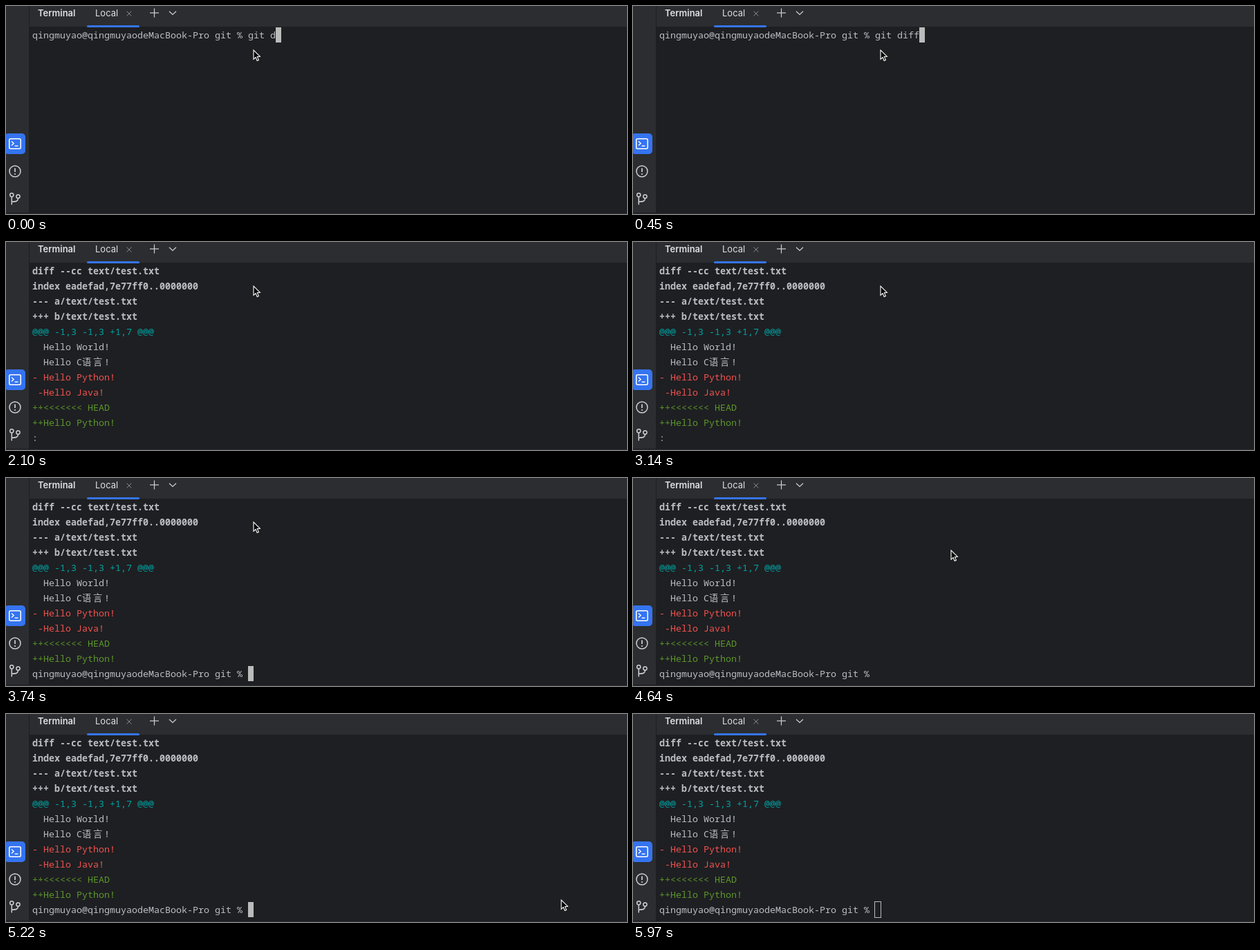
These frames come from a looping animation (898x302 px, 5990 ms). An HTML page with a canvas:

```html
<!DOCTYPE html>
<html lang="en">
<head>
<meta charset="utf-8">
<title>Terminal diff</title>
<style>
  html, body { margin: 0; width: 100%; height: 100%; overflow: hidden; background: #1e1f22; }
  canvas { display: block; width: 898px; height: 302px; }
</style>
</head>
<body>
<canvas id="stage"></canvas>
<script>
const W = 898, H = 302, LOOP = 5990;
const CELL = 8, ROW = 22, LEFT = 38, TOP = 31;
const MONO = '13.33px "Noto Sans Mono", "Noto Sans CJK SC", monospace';
const UI = '13px Inter, sans-serif';
const PANEL = '#2b2d30', BACK = '#1e1f22', BLUE = '#3574f0';
const TEXT = '#bcbec4', ICON = '#ced0d6', TITLE = '#dfe1e5', CARET = '#bbbbbb';
const CYAN = '#00a3a3', RED = '#f0524f', GREEN = '#5c962c';
const PROMPT = 'qingmuyao@qingmuyaodeMacBook-Pro git % ';

const DIFF = [
  ['diff --cc text/test.txt', TEXT, true],
  ['index eadefad,7e77ff0..0000000', TEXT, true],
  ['--- a/text/test.txt', TEXT, true],
  ['+++ b/text/test.txt', TEXT, true],
  ['@@@ -1,3 -1,3 +1,7 @@@', CYAN],
  ['  Hello World!', TEXT],
  ['  Hello C语言!', TEXT],
  ['- Hello Python!', RED],
  [' -Hello Java!', RED],
  ['++<<<<<<< HEAD', GREEN],
  ['++Hello Python!', GREEN]
];

// [start, value] steps
const TYPED = [[0, 'git d'], [150, 'git di'], [300, 'git dif'], [450, 'git diff']];
const CARETS = [
  [0, 'block'], [2100, 'none'], [2550, 'block'], [3140, 'none'], [3590, 'block'],
  [4640, 'none'], [5220, 'block'], [5670, 'none'], [5970, 'outline']
];
const POINTER = [
  [0, [357, 63]], [4640, [459, 104]], [4780, [559, 170]], [4930, [580, 176]],
  [5080, [720, 237]], [5220, [802, 269]], [5370, [836, 277]], [5520, [857, 285]], [5670, null]
];

const canvas = document.getElementById('stage');
const ctx = canvas.getContext('2d');
const dpr = window.devicePixelRatio || 1;
canvas.width = W * dpr;
canvas.height = H * dpr;
ctx.scale(dpr, dpr);

function valueAt(steps, t) {
  let value = steps[0][1];
  for (const [start, v] of steps) if (t >= start) value = v;
  return value;
}

function box(x, y, w, h, color) {
  ctx.fillStyle = color;
  ctx.fillRect(x, y, w, h);
}

function roundBox(x, y, w, h, r) {
  ctx.beginPath();
  ctx.roundRect(x, y, w, h, r);
}

function label(text, x, y, font, color) {
  ctx.font = font;
  ctx.fillStyle = color;
  ctx.fillText(text, x, y);
}

function line(color, width, ...points) {
  ctx.strokeStyle = color;
  ctx.lineWidth = width;
  ctx.beginPath();
  points.forEach(([x, y]) => ctx.lineTo(x, y));
  ctx.stroke();
}

function ring(x, y, r) {
  ctx.beginPath();
  ctx.arc(x, y, r, 0, Math.PI * 2);
  ctx.stroke();
}

// One glyph per terminal cell; CJK glyphs take two.
function print(text, row, color, bold) {
  const y = TOP + row * ROW + 16;
  let x = LEFT;
  for (const ch of text) {
    label(ch, x, y, (bold ? 'bold ' : '') + MONO, color);
    x += ch > '\u2e80' ? 2 * CELL : CELL;
  }
}

function drawCaret(col, row, style) {
  const x = LEFT + col * CELL, y = TOP + row * ROW;
  if (style === 'block') box(x, y, CELL, ROW, CARET);
  if (style === 'outline') {
    ctx.strokeStyle = CARET;
    ctx.lineWidth = 1;
    ctx.strokeRect(x - 0.5, y - 0.5, CELL + 1, ROW + 1);
  }
}

function drawSidebar() {
  ctx.fillStyle = BLUE;
  roundBox(-2, 185, 30, 30, 5);
  ctx.fill();
  ctx.strokeStyle = '#ffffff';
  ctx.lineWidth = 1.5;
  roundBox(4.75, 192.75, 16.5, 14.5, 2);
  ctx.stroke();
  line('#ffffff', 1.4, [8, 196.5], [11.2, 199.5], [8, 202.5]);
  line('#ffffff', 1.4, [12.5, 203.2], [17.5, 203.2]);

  ctx.strokeStyle = ICON;
  ctx.lineWidth = 1.5;
  ring(13, 240, 8);
  line(ICON, 1.7, [13, 235.5], [13, 241]);
  ctx.fillStyle = ICON;
  ctx.beginPath();
  ctx.arc(13, 244, 1.1, 0, Math.PI * 2);
  ctx.fill();

  ctx.lineWidth = 1.5;
  ring(8.3, 274.3, 2.6);
  ring(17.5, 276.5, 2.6);
  line(ICON, 1.5, [8.3, 277], [8.3, 288.5]);
  ctx.beginPath();
  ctx.moveTo(17.5, 279.2);
  ctx.bezierCurveTo(17.5, 283.5, 15, 284, 8.3, 284.2);
  ctx.stroke();
}

function drawFrame() {
  box(0, 0, W, H, PANEL);
  box(33, 0, 1, H, BACK);
  box(34, 30, W - 34, 270, BACK);
  box(0, 300, W, 1, BACK);

  label('Terminal', 46, 15, '600 ' + UI, TITLE);
  label('Local', 129, 15, UI, TITLE);
  ctx.fillStyle = BLUE;
  roundBox(117, 28, 76, 3, 1.5);
  ctx.fill();
  line('#868a91', 1, [174.5, 7.5], [181.5, 14.5]);
  line('#868a91', 1, [181.5, 7.5], [174.5, 14.5]);
  line(ICON, 1.2, [208, 10], [221, 10]);
  line(ICON, 1.2, [214.5, 3.5], [214.5, 16.5]);
  line(ICON, 1.2, [236, 7.8], [241, 12.5], [246, 7.8]);
  drawSidebar();
}

function drawPointer([x, y]) {
  ctx.save();
  ctx.translate(x, y);
  ctx.beginPath();
  [[1, 1], [1, 14.3], [4, 11.5], [6.2, 16.4], [8.4, 15.4], [6.3, 10.7], [10.3, 10.4]]
    .forEach(([px, py]) => ctx.lineTo(px, py));
  ctx.closePath();
  ctx.fillStyle = '#000000';
  ctx.fill();
  ctx.strokeStyle = '#ffffff';
  ctx.lineWidth = 1.1;
  ctx.stroke();
  ctx.restore();
}

function draw(t) {
  drawFrame();
  const paging = t >= 1050;
  let input = PROMPT, row = 0;
  if (paging) {
    DIFF.forEach(([text, color, bold], i) => print(text, i, color, bold));
    row = DIFF.length;
    if (t < 3740) input = ':';
  } else {
    input += valueAt(TYPED, t);
  }
  print(input, row, TEXT);
  drawCaret(input.length, row, valueAt(CARETS, t));
  const pos = valueAt(POINTER, t);
  if (pos) drawPointer(pos);
}

const start = performance.now();
function tick() {
  draw((performance.now() - start) % LOOP);
  requestAnimationFrame(tick);
}
tick();
</script>
</body>
</html>
```
